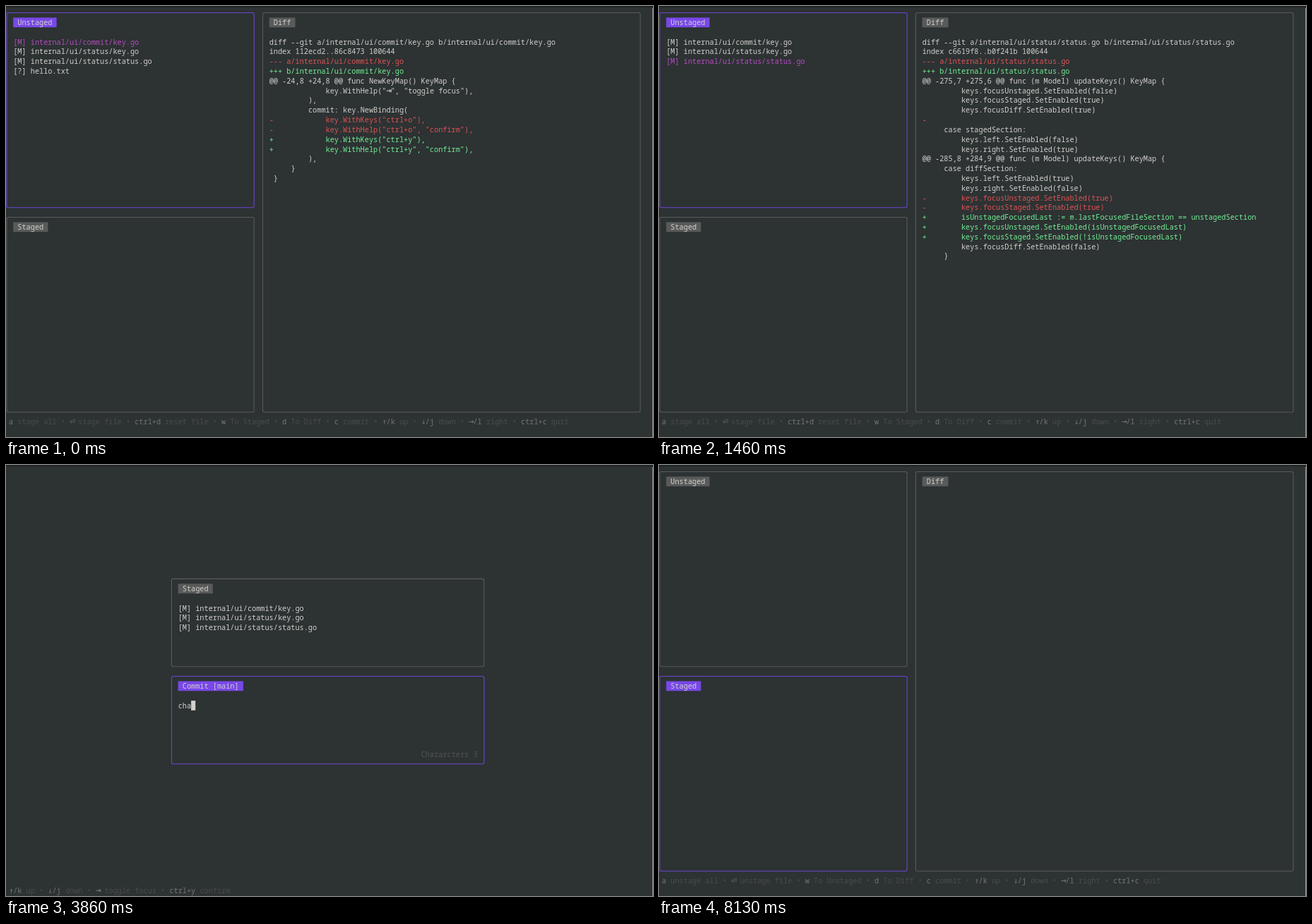
Animation, 916 px wide and 611 px high, one loop 9.13 s. Source, as an HTML page:

```html
<!DOCTYPE html>
<html lang="en">
<head>
<meta charset="utf-8">
<title>Terminal git client</title>
<style>
  html, body { margin: 0; width: 100%; height: 100%; overflow: hidden; background: #2d3233; }
  svg { display: block; width: 916px; height: 611px; }
  text { font: 10.24px "Noto Sans Mono", "DejaVu Sans Mono", monospace; white-space: pre; }
  text.sym { font: 11px "DejaVu Sans Mono", monospace; }
  text.wide { font-size: 13px; }
</style>
</head>
<body>
<svg id="stage" viewBox="0 0 916 611">
  <rect width="916" height="611" fill="#2d3233"/>
  <rect width="916" height="2" fill="#1f2324"/>
  <rect x="915" y="3" width="1" height="608" fill="#8d9191"/>
  <g id="screen"></g>
</svg>
<script>
const LOOP = 9130;
const CELL = 6.144, ROW = 13.81;
const FG = '#d1d0cc', GRAY = '#595b5a', PURPLE = '#7848e8', EDGE = '#6c45d2', PINK = '#b44cc0';
const RED = '#dc5355', GREEN = '#72ee94', KEY = '#737675', DIM = '#484c4c', SEP = '#454949';

const FILES = ['[M] internal/ui/commit/key.go', '[M] internal/ui/status/key.go', '[M] internal/ui/status/status.go'];
const NEW_FILE = '[?] hello.txt';
const MESSAGE = 'change key bindings';

const header = (path, index) => [
  `diff --git a/${path} b/${path}`, `index ${index} 100644`, `--- a/${path}`, `+++ b/${path}`
];

const DIFFS = [
  [
    ...header('internal/ui/commit/key.go', '112ecd2..86c8473'),
    '@@ -24,8 +24,8 @@ func NewKeyMap() KeyMap {',
    ' \t\t\tkey.WithHelp("⇥", "toggle focus"),',
    ' \t\t),',
    ' \t\tcommit: key.NewBinding(',
    '-\t\t\tkey.WithKeys("ctrl+o"),',
    '-\t\t\tkey.WithHelp("ctrl+o", "confirm"),',
    '+\t\t\tkey.WithKeys("ctrl+y"),',
    '+\t\t\tkey.WithHelp("ctrl+y", "confirm"),',
    ' \t\t),',
    ' \t}',
    ' }'
  ],
  [
    ...header('internal/ui/status/key.go', '5b0c1d7..e27fa90'),
    '@@ -38,8 +38,8 @@ func NewKeyMap() KeyMap {',
    ' \t\t\tkey.WithHelp("a", "stage all"),',
    ' \t\t),',
    ' \t\treset: key.NewBinding(',
    '-\t\t\tkey.WithKeys("ctrl+r"),',
    '-\t\t\tkey.WithHelp("ctrl+r", "reset file"),',
    '+\t\t\tkey.WithKeys("ctrl+d"),',
    '+\t\t\tkey.WithHelp("ctrl+d", "reset file"),',
    ' \t\t),',
    ' \t}',
    ' }'
  ],
  [
    ...header('internal/ui/status/status.go', 'c6619f8..b0f241b'),
    '@@ -275,7 +275,6 @@ func (m Model) updateKeys() KeyMap {',
    ' \t\tkeys.focusUnstaged.SetEnabled(false)',
    ' \t\tkeys.focusStaged.SetEnabled(true)',
    ' \t\tkeys.focusDiff.SetEnabled(true)',
    '-',
    ' \tcase stagedSection:',
    ' \t\tkeys.left.SetEnabled(false)',
    ' \t\tkeys.right.SetEnabled(true)',
    '@@ -285,8 +284,9 @@ func (m Model) updateKeys() KeyMap {',
    ' \tcase diffSection:',
    ' \t\tkeys.left.SetEnabled(true)',
    ' \t\tkeys.right.SetEnabled(false)',
    '-\t\tkeys.focusUnstaged.SetEnabled(true)',
    '-\t\tkeys.focusStaged.SetEnabled(true)',
    '+\t\tisUnstagedFocusedLast := m.lastFocusedFileSection == unstagedSection',
    '+\t\tkeys.focusUnstaged.SetEnabled(isUnstagedFocusedLast)',
    '+\t\tkeys.focusStaged.SetEnabled(!isUnstagedFocusedLast)',
    ' \t\tkeys.focusDiff.SetEnabled(false)',
    ' \t}'
  ],
  [
    'diff --git a/hello.txt b/hello.txt',
    'new file mode 100644',
    'index 0000000..10ddd6d',
    '--- /dev/null',
    '+++ b/hello.txt',
    '@@ -0,0 +1 @@',
    '+Hello!'
  ]
];

const NAV = 'c:commit|↑/k:up|↓/j:down|→/l:right|ctrl+c:quit';
const HELP = {
  unstaged: 'a:stage all|⏎:stage file|ctrl+d:reset file|w:To Staged|d:To Diff|' + NAV,
  staged: 'a:unstage all|⏎:unstage file|w:To Unstaged|d:To Diff|' + NAV,
  commit: '↑/k:up|↓/j:down|⇥:toggle focus|ctrl+y:confirm'
};

// Each entry holds a start time and the values that change there.
const STEPS = [
  [0, { view: 'status', focus: 'unstaged', unstaged: [...FILES, NEW_FILE], staged: [], sel: 0, diff: 0 }],
  [60, { sel: 1 }], [130, { diff: 1 }],
  [200, { sel: 2 }], [260, { diff: 2 }],
  [330, { sel: 3 }], [400, { diff: 3 }],
  [1130, { unstaged: FILES, sel: -1, diff: -1 }],
  [1460, { sel: 2, diff: 2 }],
  [2130, { unstaged: [], staged: FILES }], [2260, { diff: -1 }],
  [2730, { focus: 'staged', sel: 0, diff: 0 }],
  [3130, { view: 'commit' }],
  [8130, { view: 'status', staged: [], diff: -1 }]
];

// Typing: [time, characters present]
const TYPING = [[3660, 1], [3730, 2], [3860, 3], [4000, 4], [4200, 5], [4400, 6], [4530, 7], [4660, 8], [4800, 9],
  [5000, 10], [5260, 11], [5600, 14], [5800, 15], [5930, 16], [6130, 17], [6260, 18], [6400, 19]];
const BLINK_FROM = 6400, BLINK = 530;

const colX = c => -2.1 + c * CELL;
const rowY = r => 9.5 + r * ROW;
const num = n => n.toFixed(2);

function text(c, r, str, fill) {
  let out = '';
  for (const m of str.matchAll(/[ -~]+|[^ -~]/g)) {
    const run = m[0], lead = run.length - run.trimStart().length;
    if (lead === run.length) continue;
    const cls = /[⏎⇥→]/.test(run) ? ' class="sym wide"' : /[↑↓]/.test(run) ? ' class="sym"' : '';
    out += `<text${cls} x="${num(colX(c + m.index + lead))}" y="${num(rowY(r) + 3.7)}" fill="${fill}">${run.trim()}</text>`;
  }
  return out;
}

function block(c, r, cells, fill) {
  return `<rect x="${num(colX(c))}" y="${num(rowY(r) - ROW / 2)}" width="${num(cells * CELL)}" height="${ROW}" fill="${fill}"/>`;
}

function panel(c0, r0, c1, r1, title, focused) {
  const x = colX(c0 + 0.5), y = rowY(r0);
  return `<rect x="${num(x)}" y="${num(y)}" width="${num(colX(c1 + 0.5) - x)}" height="${num(rowY(r1) - y)}" rx="2.5"
    fill="none" stroke="${focused ? EDGE : GRAY}" stroke-width="1.1"/>`
    + block(c0 + 2, r0 + 1, title.length + 2, focused ? PURPLE : GRAY)
    + text(c0 + 3, r0 + 1, title, FG);
}

const list = (c, r, files, sel) =>
  files.map((f, i) => text(c, r + i, f, i === sel ? PINK : FG)).join('');

const tint = line => line[0] === '-' ? RED : line[0] === '+' ? GREEN : FG;
const diffLines = lines =>
  lines.map((l, i) => text(61, 3 + i, l.replace(/\t/g, '    '), tint(l))).join('');

function help(r, items) {
  let c = 1, out = '';
  items.split('|').forEach((item, i) => {
    const [key, label] = item.split(':');
    if (i) {
      out += text(c + 1, r, '•', SEP);
      c += 3;
    }
    out += text(c, r, key, KEY) + text(c + key.length + 1, r, label, DIM);
    c += key.length + 1 + label.length;
  });
  return out;
}

function statusView(s) {
  const left = s.focus === 'unstaged';
  return panel(0, 0, 57, 20, 'Unstaged', left)
    + panel(0, 21, 57, 41, 'Staged', !left)
    + panel(59, 0, 146, 41, 'Diff', false)
    + list(2, 3, s.unstaged, left ? s.sel : -1)
    + list(2, 24, s.staged, left ? -1 : s.sel)
    + diffLines(DIFFS[s.diff] || [])
    + help(42, HELP[s.focus]);
}

function commitView(s, t) {
  const typed = TYPING.reduce((n, [at, count]) => t >= at ? count : n, 0);
  const lit = t < BLINK_FROM || Math.floor((t - BLINK_FROM) / BLINK) % 2 === 0;
  const counter = 'Chararcters ' + typed;
  return panel(38, 11, 110, 20, 'Staged', false)
    + list(40, 14, s.staged, -1)
    + panel(38, 21, 110, 30, 'Commit [main]', true)
    + text(40, 24, MESSAGE.slice(0, typed), FG)
    + (lit ? block(40 + typed, 24, 1, FG) : '')
    + text(109 - counter.length, 29, counter, '#515554')
    + help(43, HELP.commit);
}

const screen = document.getElementById('screen');
let shown = '';

function draw(t) {
  const s = {};
  for (const [at, change] of STEPS) if (t >= at) Object.assign(s, change);
  const markup = s.view === 'commit' ? commitView(s, t) : statusView(s);
  if (markup !== shown) screen.innerHTML = shown = markup;
}

let start;
function tick(now) {
  start ??= now;
  draw((now - start) % LOOP);
  requestAnimationFrame(tick);
}
draw(0);
requestAnimationFrame(tick);
</script>
</body>
</html>
```
